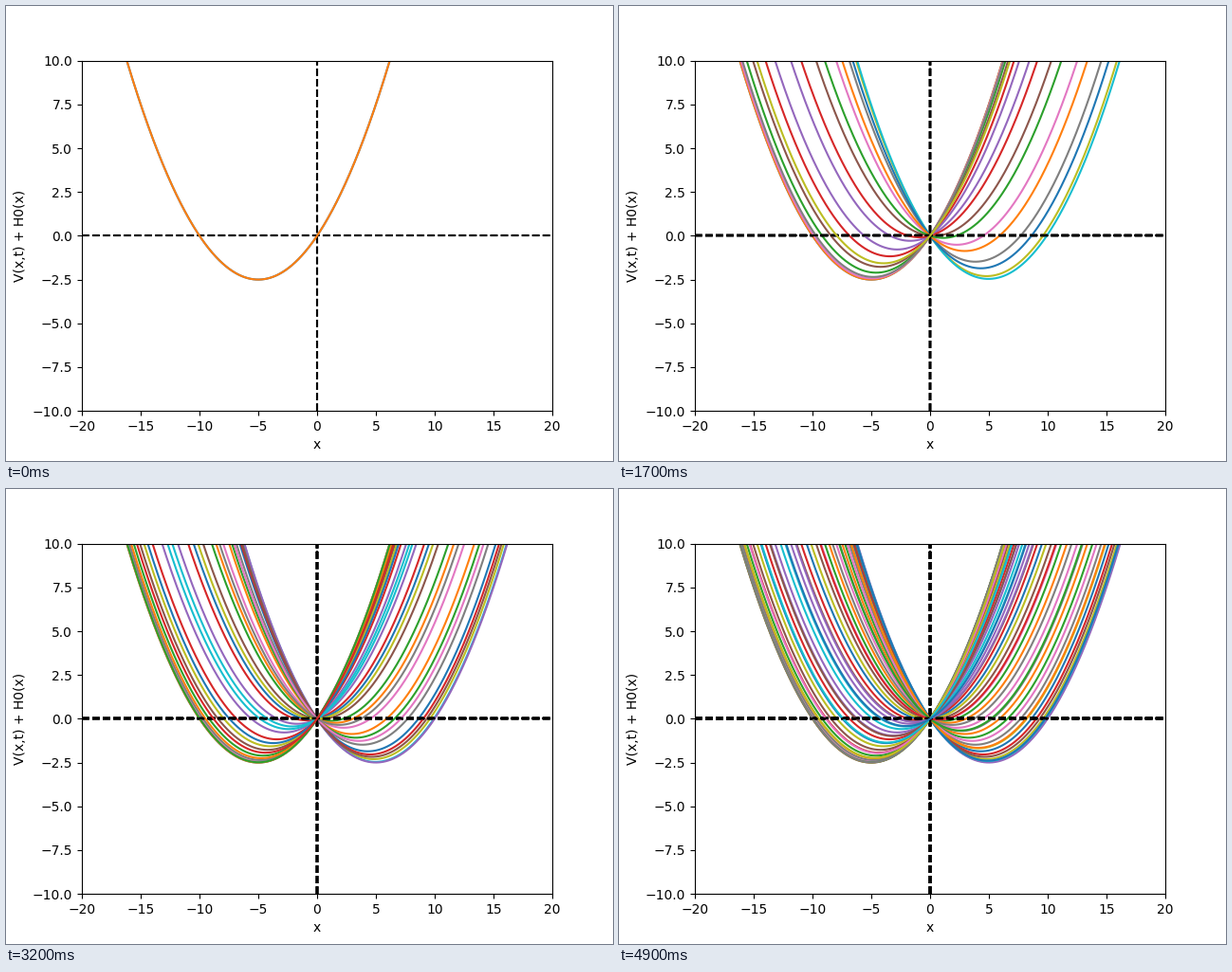
Write a matplotlib script that moves like this. It is 640x480 px and loops after 5 s.

```python
import numpy as np
import matplotlib.pyplot as plt
from matplotlib.animation import FuncAnimation

FRAMES = 50
INTERVAL = 100  # ms

x = np.linspace(-20, 20, 1000)
times = np.linspace(0, 20, FRAMES)

fig, ax = plt.subplots(figsize=(6.4, 4.8), dpi=100)


def potential(t):
    """Harmonic well tilted by an oscillating linear field."""
    return 0.1 * x**2 + x * np.cos(t)


def add_layer(index, t):
    dashes = dict(color="black", linestyle="--")
    return [
        ax.axvline(0, **dashes),
        ax.axhline(0, **dashes),
        ax.plot(x, potential(t), color=f"C{index % 10}")[0],
    ]


# The starting curve is laid down twice, then one layer is added per step.
layers = [add_layer(i, t) for i, t in enumerate([times[0], *times])]

ax.set_xlim(-20, 20)
ax.set_ylim(-10, 10)
ax.set_xlabel("x")
ax.set_ylabel("V(x,t) + H0(x)")


def update(frame):
    for i, layer in enumerate(layers):
        for artist in layer:
            artist.set_visible(i <= frame + 1)
    return [artist for layer in layers for artist in layer]


anim = FuncAnimation(fig, update, frames=FRAMES, interval=INTERVAL,
                     repeat=True, repeat_delay=0, blit=False)
plt.show()
```
